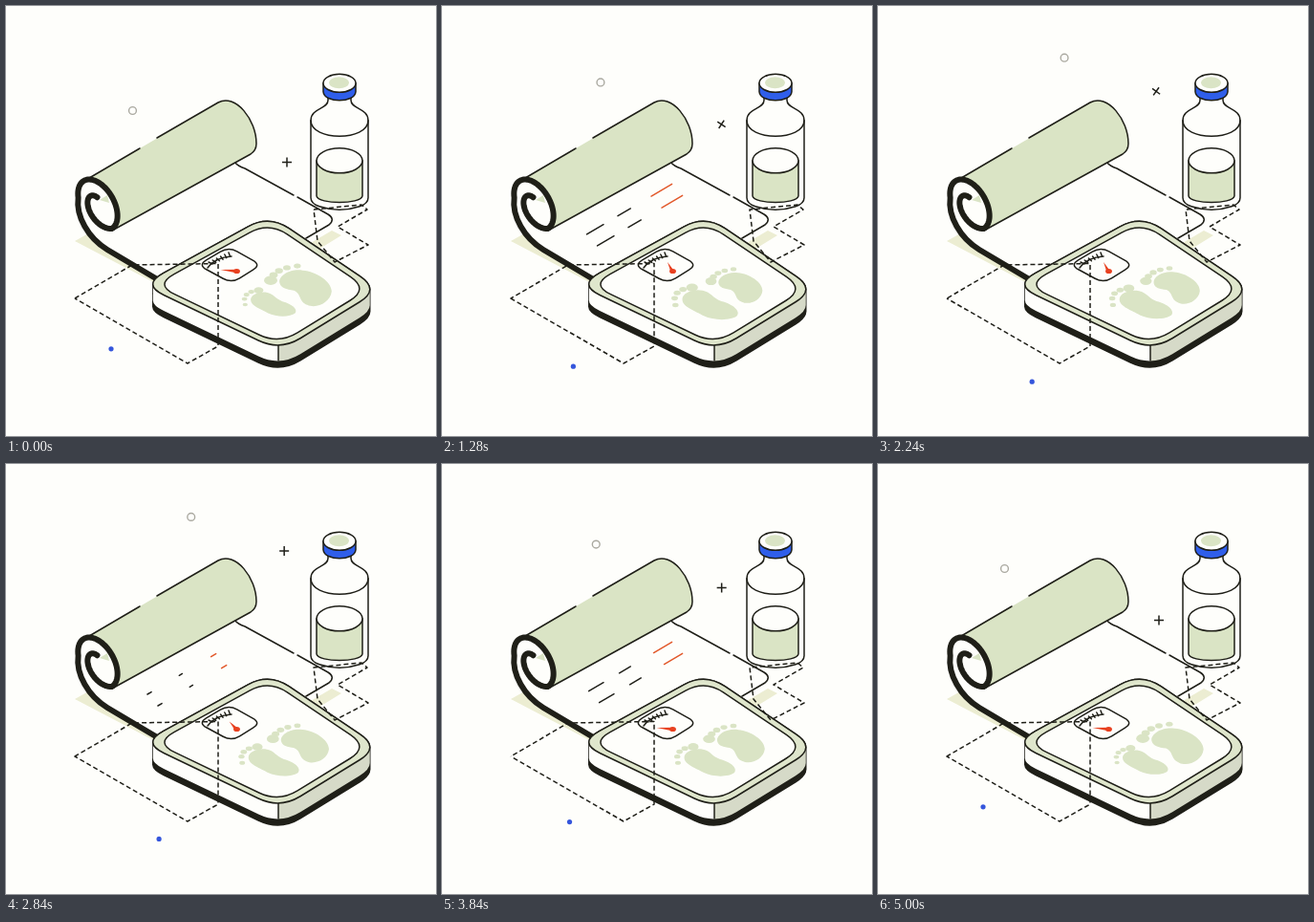
An HTML page that plays this animation: 450 px wide and 450 px high, repeating every 5040 ms.

```html
<!DOCTYPE html>
<html lang="en">
<head>
<meta charset="utf-8">
<title>Scale, paper roll and vial</title>
<style>
  html, body { margin: 0; width: 100%; height: 100%; overflow: hidden; background: #fefefb; }
  svg { display: block; width: 100vw; height: 100vh; }
  .ink { fill: none; stroke: #1f1f18; stroke-width: 1.5; stroke-linecap: round; stroke-linejoin: round; }
  .white { fill: #fefefb; }
  .green { fill: #dae4c5; }
  .rim { fill: #dfe6cc; }
  .band { stroke-width: 6; }
  .dash { stroke-dasharray: 5 3; stroke-linecap: butt; }
  .orange { stroke: #e2592b; }
</style>
</head>
<body>
<svg viewBox="0 0 450 450">
  <linearGradient id="sides" gradientUnits="userSpaceOnUse" x1="285" x2="286">
    <stop offset="0" stop-color="#fefefb"/>
    <stop offset="0" stop-color="#d6dac8"/>
  </linearGradient>

  <!-- paper roll -->
  <path fill="#ecedd2" d="M72 246L90 236 160 277V292ZM312 252L341 235 351 240 325 256Z"/>
  <path class="white" d="M85 184L76 220 104 256 158 288 320 246 341 224 239 163Z"/>
  <path class="ink" d="M239 163Q243 168 250 170L301 198M305 200L337 218Q345 223 338 229L314 243"/>
  <path class="green" d="M82 183L222 101C240 91 262 119 262 144Q262 151 256 155L111 235Z"/>
  <path class="ink" d="M82 183L140 149M158 138L222 101C240 91 262 119 262 144Q262 151 256 155L111 235"/>
  <ellipse class="white" rx="29" ry="17" transform="translate(96 208) rotate(60)"/>
  <path class="green" d="M98 203L106 198 108 206Z"/>
  <path id="spiral" class="ink band"/>
  <g id="rows"></g>

  <!-- vial -->
  <g transform="translate(0 .8)">
    <path class="ink white" d="M337 94V98C337 107 319 106 319 119V200Q319 206 328 209Q349 216 370 209Q379 206 379 200V119C379 106 361 107 361 98V94"/>
    <path class="ink" d="M319 119C319 141 379 141 379 119"/>
    <path class="ink green" d="M325 161V198C327 207 371 207 373 198V161"/>
    <ellipse class="ink white" cx="349" cy="161" rx="24" ry="13"/>
    <path class="ink" style="fill:#2f5eea" d="M332 80V89C333 101 365 101 366 89V80"/>
    <ellipse class="ink white" cx="349" cy="80" rx="17" ry="9.5"/>
    <ellipse class="green" cx="348.5" cy="79.5" rx="10.5" ry="6"/>
  </g>

  <!-- scale -->
  <path id="base" class="ink" style="fill:#1f1f18"/>
  <path id="body" fill="url(#sides)"/>
  <path class="ink" d="M285 355V371"/>
  <path id="rim" class="ink rim"/>
  <path id="plate" class="ink white"/>
  <path id="dial" class="ink white"/>
  <path id="ticks" class="ink"/>
  <g fill="#e8401f">
    <path id="needle"/>
    <ellipse cx="241.5" cy="277.5" rx="3.4" ry="2.6"/>
  </g>
  <g id="leftFoot" class="green">
    <path d="M252 307C252 300 264 296 273 298C282 300 282 305 292 309C304 312 312 319 308 324C302 329 284 329 274 324C266 319 252 315 252 307Z"/>
  </g>
  <g id="rightFoot" class="green">
    <path d="M289 290C288 283 300 277 310 279C322 280 336 289 336 298C335 308 322 314 314 310C306 307 309 300 302 297C295 296 290 295 289 290Z"/>
  </g>

  <path class="ink dash" d="M72 306L132 271 222 269.5V356L190 374Z"/>
  <path class="ink dash" d="M322 213L372 208 378 213 347 231 379 250 344 268 326 246Z"/>

  <!-- floating marks -->
  <circle id="ring" r="3.9" fill="none" stroke="#aaa9a0" stroke-width="1.4"/>
  <circle id="dot" r="2.6" fill="#3556dc"/>
  <path id="plus" class="ink" style="stroke-linecap:butt" d="M-5 0H5M0-5V5"/>
</svg>
<script>
  const LOOP = 5040, HALF = 2500, RAD = Math.PI / 180;
  const $ = id => document.getElementById(id);
  const setPath = (id, d) => $(id).setAttribute('d', d);
  const add = (parent, tag, attrs) => {
    const el = document.createElementNS('http://www.w3.org/2000/svg', tag);
    for (const key in attrs) el.setAttribute(key, attrs[key]);
    return parent.appendChild(el);
  };
  const mix = (a, b, k) => a + (b - a) * k;
  const ease = (t, from, to) => {
    const x = Math.min(1, Math.max(0, (t - from) / (to - from)));
    return x * x * (3 - 2 * x);
  };

  // Closed polygon with softened corners
  function rounded(points, radius) {
    const toward = ([x, y], [x2, y2]) => {
      const k = radius / Math.hypot(x2 - x, y2 - y);
      return [mix(x, x2, k), mix(y, y2, k)];
    };
    return points.map((p, i) => {
      const before = points.at(i - 1), after = points[(i + 1) % points.length];
      return `${i ? 'L' : 'M'}${toward(p, before)}Q${p} ${toward(p, after)}`;
    }).join('') + 'Z';
  }

  const top4 = [[142.6, 291.7], [275.3, 218.8], [391.3, 296.7], [286.7, 360.8]];
  const extrude = height => Array.from({ length: height * 2 + 1 }, (_, i) =>
    rounded(top4.map(([x, y]) => [x, y + i / 2]), 25)).join('');
  setPath('base', extrude(23));
  setPath('body', extrude(16.5));
  setPath('rim', rounded(top4, 25));
  setPath('plate', rounded(top4.map(([x, y]) => [mix(274, x, 0.9), mix(292, y, 0.9)]), 23));
  setPath('dial', rounded([[201, 271], [233, 252], [267, 271], [236, 290]], 10));

  let marks = 'M211 274Q219 263 236 262';
  for (let k = 0; k <= 1; k += 0.2) marks += `M${mix(212, 233, k)} ${mix(268, 258, k)}l${mix(4, 1.5, k)} ${mix(2, 4, k)}`;
  setPath('ticks', marks);

  // Rolled edge: a full turn on a tilted ellipse, then a shrinking coil
  let coil = 'M160 287L106 255C86 243 73 220 ';
  for (let a = 235; a >= -220; a -= 5) {
    const r = Math.min(1, Math.exp(a / 190));
    const u = 29 * r * Math.cos(a * RAD), v = 17 * r * Math.sin(a * RAD);
    coil += `${a < 235 ? 'L' : ''}${96 + u * 0.5 + v * 0.866} ${208 + u * 0.866 - v * 0.5}`;
  }
  setPath('spiral', coil);

  // Toes sit on a quadratic curve and get smaller
  function addToes(foot, [x0, y0], [x1, y1], [x2, y2]) {
    for (let i = 0; i < 5; i++) {
      const k = i / 4, curve = (a, b, c) => mix(mix(a, b, k), mix(b, c, k), k);
      const size = i ? 4 - i * 0.2 : 6;
      add($(foot), 'ellipse', { cx: curve(x0, x1, x2), cy: curve(y0, y1, y2), rx: size, ry: size * 0.68 });
    }
  }
  addToes('leftFoot', [262, 295], [240, 297], [245, 313]);
  addToes('rightFoot', [281, 288], [284, 277], [305, 275]);

  const rows = [21, 16, 26].flatMap((length, column) => [0, 1].map(line => ({
    x: 148 + 33.3 * column + 11 * line,
    y: 241 - 19.7 * column + 12 * line,
    length,
    el: add($('rows'), 'path', { class: column < 2 ? 'ink' : 'ink orange' })
  })));

  const place = (id, x, y, turn = 0) => $(id).setAttribute('transform', `translate(${x} ${y}) rotate(${turn})`);
  const zoom = (id, x, y, s) => $(id).setAttribute('transform', `translate(${x} ${y}) scale(${s}) translate(${-x} ${-y})`);

  function draw(t) {
    const drift = ease(t, 0, HALF) - ease(t, HALF, 2 * HALF);
    place('ring', mix(132.5, 197, drift), mix(109.5, 52.5, drift));
    place('dot', mix(110, 162.8, drift), mix(358.8, 394.2, drift));
    place('plus', mix(294, 291, drift), mix(163.5, 87, drift), 270 * Math.min(1, t / 2800));

    const sway = Math.cos(2 * Math.PI * t * 5 / LOOP);
    zoom('leftFoot', 276, 310, 1 - 0.17 * sway);
    zoom('rightFoot', 306, 293, 1 + 0.16 * sway);

    const swing = ease(t, 0, 1200) - ease(t, HALF, 3700);
    const dx = mix(-16.5, -5, swing), dy = mix(-1.5, -9.5, swing);
    const side = 1.8 / Math.hypot(dx, dy);
    setPath('needle', `M241 277.5m${dx} ${dy}L${241 - dy * side} ${277.5 + dx * side}L${241 + dy * side} ${277.5 - dx * side}Z`);

    const local = t % HALF;
    const head = ease(local, 80, 1000), tail = ease(local, 1080, 1850);
    for (const { x, y, length, el } of rows) {
      const point = k => `${x + length * k} ${y - length * 0.585 * k}`;
      el.setAttribute('d', head > tail ? `M${point(tail)}L${point(head)}` : '');
    }

    for (const el of document.querySelectorAll('.dash')) el.style.strokeDashoffset = -56 * t / LOOP;
  }

  const tick = () => {
    draw(performance.now() % LOOP);
    requestAnimationFrame(tick);
  };
  tick();
</script>
</body>
</html>
```
